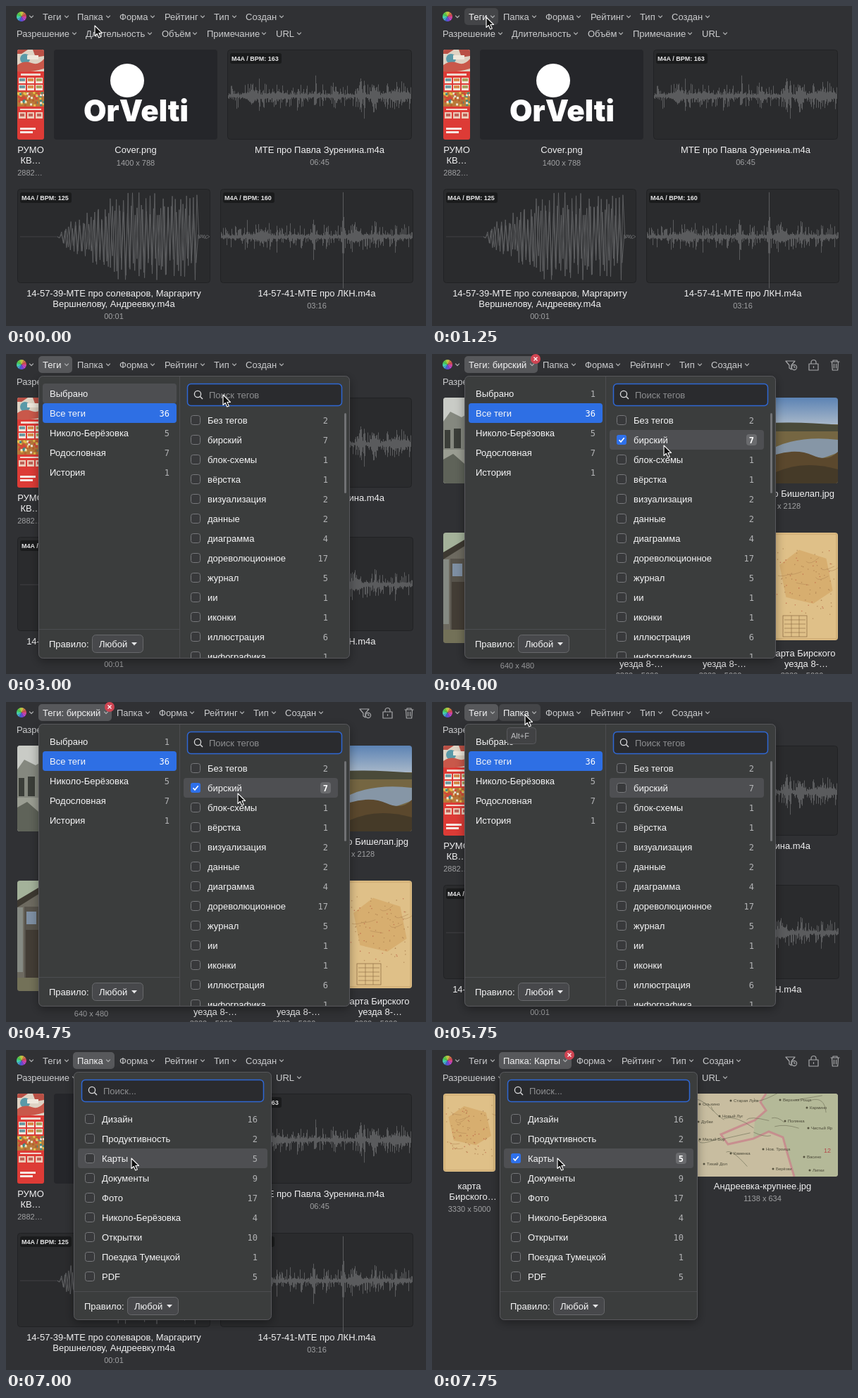
An HTML page for the animation above (8 s loop, 596 by 455 pixels).

```html
<!DOCTYPE html>
<html lang="ru">
<head>
<meta charset="utf-8">
<title>Фильтры</title>
<style>
html, body { margin: 0; width: 100%; height: 100%; overflow: hidden; background: #303134; }
svg { display: block; }
text { font: 13px "Liberation Sans", Arial, sans-serif; white-space: pre; }
.bar { fill: #cbccce; }
.cap { fill: #f0f0f1; text-anchor: middle; }
.dim { fill: #a0a1a3; font-size: 11px; text-anchor: middle; }
.item { fill: #f6f6f7; }
.hint { fill: #8d8e90; }
.num { font: 12px "DejaVu Sans Mono", monospace; fill: #b2b3b5; text-anchor: end; }
.on { fill: #fff; }
.badge { font-size: 9px; font-weight: bold; fill: #e6e6e7; }
.tiny { font-size: 6px; fill: #4a4838; }
.line { fill: none; stroke: #a6a7a9; stroke-width: 1.2; stroke-linecap: round; stroke-linejoin: round; }
</style>
</head>
<body>
<svg id="stage" width="596" height="455" viewBox="0 0 596 455"></svg>
<script>
const LOOP = 8000, STEP = 250;
const stage = document.getElementById('stage');
const $ = id => document.getElementById(id);

const text = (x, y, s, cls, extra = '') => `<text x="${x}" y="${y}" class="${cls}" ${extra}>${s}</text>`;
const rect = (x, y, w, h, fill, r = 0, extra = '') =>
  `<rect x="${x}" y="${y}" width="${w}" height="${h}" rx="${r}" fill="${fill}" ${extra}/>`;
const circle = (x, y, r, fill, extra = '') => `<circle cx="${x}" cy="${y}" r="${r}" fill="${fill}" ${extra}/>`;
const path = (d, extra = '') => `<path d="${d}" ${extra}/>`;
const group = (id, body, extra = '') => `<g id="${id}" ${extra}>${body}</g>`;
const clip = (id, x, y, w, h, r) => `<clipPath id="${id}">${rect(x, y, w, h, '#000', r)}</clipPath>`;
const chevron = (x, y) => path(`M${x - 2.5} ${y - 1}l2.5 2.5 2.5-2.5`, 'class="line"');
const clipped = (id, body) => `<g clip-path="url(#${id})">${body}</g>`;

function random(seed) {
  return () => (seed = (seed * 16807) % 2147483647) / 2147483647;
}

// Waveforms: a dense core with rare long spikes, tallest at the peaks [x, height, width]
function wave(x0, x1, cy, seed, peaks) {
  const rnd = random(seed);
  let d = '';
  for (let x = x0; x < x1; x++) {
    const peak = peaks.reduce((s, [p, h, w = 1]) => s + h * Math.exp(-(((x - p) / w) ** 2)), 0);
    const reach = () => 1.2 + 2.5 * rnd() + 15 * rnd() ** 5 + peak * (.4 + .6 * rnd());
    d += `M${x + .5} ${(cy - reach()).toFixed(1)}V${(cy + reach()).toFixed(1)}`;
  }
  return path(d, 'stroke="#606164" stroke-width=".9"');
}

// Swings of uneven height that widen to the right
function swing(x0, x1, cy, seed, step) {
  const rnd = random(seed);
  let d = `M${x0} ${cy}`;
  for (let x = x0, k = 0; x < x1; x += step * (.85 + .3 * rnd()), k++) {
    const a = (x > 272 ? 3 : 10 + 50 * Math.min(1, (x - x0) / 90)) * Math.min(1, (x - x0) / 12) * (.5 + .55 * rnd());
    d += `L${x.toFixed(1)} ${(cy + (k % 2 ? a : -a)).toFixed(1)}`;
  }
  return path(d + `L289 ${cy}`, 'fill="none" stroke="#606164" stroke-width=".9"');
}

const audioCard = (x, y, w, h, bpm, art) =>
  rect(x + .5, y + .5, w - 1, h - 1, '#2a2b2d', 4, 'stroke="#212224"') + art +
  rect(x + 4, y + 5, 73, 15, '#1a1b1c', 3) + text(x + 6, y + 16, `M4A / BPM: ${bpm}`, 'badge');

function poster() {
  const rnd = random(8), tones = ['#e8c04a', '#d5453a', '#3f8a84', '#efe2d0', '#b8602f'];
  let s = rect(16, 62, 38, 128, '#dd3b36') + rect(16, 62, 38, 31, '#ded3c4') +
    path('M16 62h15l-9 6h-6zM38 62h16v9l-12 2z', 'fill="#b95045"') + circle(27, 75, 7, '#5a9aa8') +
    path('M16 84q10-7 20-3t18-6v14q-20 6-38 4z', 'fill="#c9584a"') + rect(30, 70, 16, 6, '#efe8dc') +
    rect(21, 96, 28, 3, '#f0d8cf');
  for (let i = 0; i < 6; i++) {
    const x = 18 + i % 3 * 12, y = 102 + (i > 2 ? 10 : 0);
    s += rect(x, y, 10, 8, '#f2e6da') + rect(x + 1, y + 1, 8, 4, ['#6c9aa2', '#d8894a', '#a9a05c'][i % 3]);
  }
  s += rect(16, 122, 38, 21, '#b8793a');
  for (let i = 0; i < 70; i++)
    s += rect((16 + 36 * rnd()).toFixed(1), (122 + 18 * rnd()).toFixed(1), 3, 3, tones[i % 5]);
  s += rect(20, 146, 30, 2, '#f2d5ce');
  for (let i = 0; i < 3; i++) s += rect(18 + i * 12, 151, 10, 9, '#eccab8') + rect(20 + i * 12, 153, 6, 4, '#bd6258');
  return s + rect(20, 173, 22, 3, '#f7e6e2') + rect(20, 178, 18, 3, '#f7e6e2');
}

// Old tan map with scattered marks
function tanMap(x, y, w, h, seed) {
  const rnd = random(seed);
  let s = rect(x, y, w, h, '#dfc088') +
    path(`M${x + w * .1} ${y + h * .3}l${w * .3} ${-h * .14} ${w * .42} ${h * .08} ${w * .1} ${h * .3} ${-w * .3} ${h * .12} ${-w * .42} ${-h * .06}z`,
      'fill="#d2a260" opacity=".6"');
  for (let i = 0; i < 80; i++)
    s += circle((x + w * (.06 + .88 * rnd())).toFixed(1), (y + h * (.14 + .66 * rnd())).toFixed(1), .8, i % 3 ? '#a8794a' : '#b9543c', 'opacity=".65"');
  for (let i = 0; i < 7; i++)
    s += path(`M${x + w * rnd()} ${y + h * (.2 + .5 * rnd())}q${8 * rnd()} ${9 * rnd()} ${w * .2} ${12 * rnd() - 6}`,
      'fill="none" stroke="#b58a58" stroke-width=".6"');
  return s + rect(x + 2, y + 2, w - 4, h - 4, 'none', 0, 'stroke="#b99258" stroke-width=".6"');
}

function greenMap() {
  const rnd = random(31);
  let s = rect(362, 62, 214, 118, '#c8bda0') +
    path('M474 62l-8 12 8 12-16 14-2 26 22-10 20 8 6 22 10 34h62V62z', 'fill="#b4b998"') +
    path('M474 62l-8 12 8 12-16 14-20 8-28 12 10 14 36-8 22-10 20 8 6 22 10 34', 'fill="none" stroke="#c9808a" stroke-width="3" opacity=".75"');
  for (let i = 0; i < 13; i++)
    s += path(`M${370 + 190 * rnd()} ${64 + 100 * rnd()}q${20 * rnd()} ${24 * rnd() - 12} ${34 * rnd() + 12} ${40 * rnd() - 16}`,
      'fill="none" stroke="#77785f" stroke-width=".7"');
  [[384, 79, 'Ольхино'], [428, 74, 'Старая Лука'], [498, 73, 'Верхняя Роща'], [536, 84, 'Кармино'], [382, 104, 'Дубки'],
   [412, 96, 'Новый Луг'], [505, 103, 'Полянка'], [538, 113, 'Чистый Яр'], [384, 129, 'Малый Бор'], [428, 149, 'Каменка'],
   [474, 143, 'Нов. Троица'], [532, 154, 'Васино'], [390, 164, 'Тихий Дол'], [488, 171, 'Берёзки'], [540, 173, 'Липки']]
    .forEach(([x, y, name]) => { s += text(x, y, name, 'tiny') + circle(x - 4, y - 2, 1.5, '#55523f'); });
  return s + text(556, 146, '12', 'tiny', 'style="font-size:9px;fill:#b5474a"');
}

const oldPhoto = rect(16, 62, 60, 122, '#b9bbb4') + rect(16, 62, 60, 36, '#c9cbc6') +
  path('M16 96l10-14 16 8 10-6v54H16z', 'fill="#85887f"') + path('M18 108h8v26h-8zM31 106h10v28H31z', 'fill="#3b3e39"') +
  rect(16, 136, 60, 48, '#9a9d92') + path('M16 150l14-8 16 14v28H16z', 'fill="#5f6359"');

const lake = rect(440, 62, 136, 122, 'url(#sky)') + rect(440, 100, 136, 84, '#756642') +
  path('M440 101q60-7 136 0v9H440z', 'fill="#4a4a39"') + path('M488 132q36-16 88-10v18q-40 18-88 14z', 'fill="#8696a6"') +
  path('M488 143q30-9 52 1t36-5v45h-88z', 'fill="#5b482d"') + path('M488 168q40-18 88-4v20h-88z', 'fill="#453a28"');

const house = rect(16, 254, 90, 157, '#6d6a60') + path('M16 254h32v9l-32 20z', 'fill="#a4b29a"') + path('M16 282l32-19v9l-32 20z', 'fill="#3d3931"') +
  rect(16, 292, 8, 92, '#858a83') + rect(26, 291, 20, 110, '#57534b') + rect(29, 298, 14, 18, '#7e8fa3') +
  rect(28, 324, 18, 78, '#433d35') + rect(16, 392, 34, 19, '#737158');

const allGrid =
  clipped('c1', poster()) + text(35, 209, 'РУМО', 'cap') + text(35, 224, 'КВ…', 'cap') + text(34, 241, '2882…', 'dim') +
  rect(68, 62, 232, 128, '#25262a', 4) + circle(172, 106, 24, '#fff') +
  text(110, 164, 'OrVelti', 'on', 'style="font:900 42px Inter,sans-serif"') +
  text(184, 209, 'Cover.png', 'cap') + text(184, 227, '1400 x 788', 'dim') +
  audioCard(314, 62, 262, 128, 163, wave(315, 575, 128, 17,
    [[349, 8, 8], [359, 22], [386, 4, 14], [414, 14], [439, 24], [468, 8, 3], [503, 24, 2], [508, 32], [522, 16, 4], [541, 22], [556, 7, 14]])) +
  text(445, 209, 'МТЕ про Павла Зуренина.m4a', 'cap') + text(445, 226, '06:45', 'dim') +
  audioCard(16, 260, 274, 134, 125, path('M20 328H73', 'stroke="#404144"') + swing(73, 286, 328, 77, 3.1) + swing(73, 286, 328, 15, 2.6)) +
  text(153, 413, '14-57-39-МТЕ про солеваров, Маргариту', 'cap') + text(153, 428, 'Вершнелову, Андреевку.m4a', 'cap') + text(153, 445, '00:01', 'dim') +
  audioCard(304, 260, 274, 134, 160, wave(305, 577, 328, 29,
    [[342, 16], [362, 8, 10], [384, 20], [403, 16], [436, 22, 2], [455, 20], [478, 62], [496, 8, 8], [524, 14, 2], [553, 14]])) +
  text(441, 413, '14-57-41-МТЕ про ЛКН.m4a', 'cap') + text(441, 430, '03:16', 'dim');

const tagGrid =
  clipped('c2', oldPhoto) + clipped('c3', lake) + clipped('c4', house) + clipped('c5', tanMap(484, 254, 92, 153, 5)) +
  rect(498, 372, 34, 30, 'none', 0, 'stroke="#8b6840" stroke-width=".7"') +
  path('M500 378h30M500 384h30M500 390h30M500 396h30M510 372v30M521 372v30', 'stroke="#8b6840" stroke-width=".6"') +
  text(571, 203, 'р Бишелап.jpg', 'cap', 'style="text-anchor:end"') + text(523, 220, 'x 2128', 'dim', 'style="text-anchor:end"') +
  text(121, 447, '640 x 480', 'dim') + text(527, 430, 'карта Бирского', 'cap') +
  [297, 415, 531].map(x => text(x, 445, 'уезда 8-…', 'cap') + text(x - 6, 461, '3330 x 5000', 'dim')).join('');

const mapGrid =
  clipped('c6', tanMap(16, 62, 74, 111, 9)) + text(53, 198, 'карта', 'cap') + text(58, 213, 'Бирского…', 'cap') + text(53, 230, '3330 x 5000', 'dim') +
  clipped('c7', greenMap()) + text(469, 198, 'Андреевка-крупнее.jpg', 'cap') + text(469, 215, '1138 x 634', 'dim');

function wheel() {
  let s = '';
  for (let i = 0; i < 12; i++) {
    const p = k => `${22 + 7 * Math.sin(k * Math.PI / 6)} ${15 - 7 * Math.cos(k * Math.PI / 6)}`;
    s += path(`M22 15L${p(i)}A7 7 0 0 1 ${p(i + 1)}z`, `fill="hsl(${50 - i * 30} 58% 54%)"`);
  }
  return s + chevron(36, 15);
}

const lateItems = [[161, 'Форма', 208], [225, 'Рейтинг', 279], [295, 'Тип', 324], [340, 'Создан', 391]];
const lowItems = [[15, 'Разрешение', 97], [113, 'Длительность', 204], [221, 'Объём', 268], [285, 'Примечание', 366], [383, 'URL', 416]];
const menuItems = (list, y) => list.map(([x, s, c]) => text(x, y, s, 'bar') + chevron(c, y - 4.5)).join('');
const closeMark = id => group(id, circle(0, 7, 7, '#cf4452') + path('M-2.5 4.5l5 5m0-5l-5 5', 'stroke="#fff" stroke-width="1.2"'));

const toolIcons =
  path('M502 10h13l-5 6v6l-3-2v-4z', 'class="line"') + circle(514, 19, 3.6, '#303134', 'class="line" style="fill:#303134"') + path('M514 17v2h1.5', 'class="line"') +
  path('M535 14h13v9h-13zM538 14v-2a3.5 3.5 0 0 1 7 0v2M541.500 17.500v2', 'class="line"') +
  path('M566 11h12M569 11v-2h6v2M567.500 11l.8 12h7.400l.8-12M570.500 14v6M573.500 14v6', 'class="line"');

const bar = wheel() +
  rect(46, 3, 48, 24, '#57585b', 5, 'id="tagBtn"') + text(52, 19.5, 'Теги', 'bar', 'id="tagText"') + group('tagChev', chevron(86, 15)) +
  group('folder', rect(95, 3, 59, 24, '#57585b', 5, 'id="folBtn"') + text(101, 19.5, 'Папка', 'bar', 'id="folText"') + group('folChev', chevron(145, 15))) +
  group('late', menuItems(lateItems, 19.5)) + closeMark('tagClose') + closeMark('folClose') + group('icons', toolIcons);

const panel = (x, y, w, h) => rect(x + .5, y + .5, w - 1, h - 1, '#3b3c3e', 6, 'stroke="#58595c" filter="url(#shadow)"');
const search = (x, w, s) => rect(x + .5, 42.5, w - 1, 31, '#2a2b2e', 5, 'stroke="#2f67d3" stroke-width="1.5"') +
  circle(x + 15, 57, 4.6, 'none', 'stroke="#dcdcde" stroke-width="1.3"') +
  path(`M${x + 18.5} 60.500l3.500 3.500`, 'stroke="#dcdcde" stroke-width="1.4"') + text(x + 31, 62.5, s, 'hint');
const rule = (x, y) => text(x, y + 4.5, 'Правило:', 'item') +
  rect(x + 61.5, y - 12.5, 72, 25, '#47484b', 5, 'stroke="#67686b"') + text(x + 71, y + 4.5, 'Любой', 'item') +
  path(`M${x + 117} ${y - 2}h8l-4 4.500z`, 'fill="#e6e6e8"');
const checks = (x, y0, numX, list) => list.map(([s, n], i) => {
  const y = y0 + 28 * i;
  return rect(x + .5, y - 6.5, 13, 13, '#38393b', 3, 'stroke="#77787b"') + text(x + 24, y + 4.5, s, 'item') + text(numX, y + 4.5, n, 'num');
}).join('');
const ticked = (id, x, y, numX, n) => group(id, rect(x, y - 7, 14, 14, '#2e70ea', 3) +
  path(`M${x + 3.5} ${y + .2}l2.500 2.800 4.700-5.800`, 'fill="none" stroke="#fff" stroke-width="1.7"') +
  rect(numX - 11, y - 8, 15, 16, '#6a6b6e', 4) + text(numX, y + 4.5, n, 'num on', 'style="font-weight:bold"'));

const tags = [['Без тегов', 2], ['бирский', 7], ['блок-схемы', 1], ['вёрстка', 1], ['визуализация', 2], ['данные', 2], ['диаграмма', 4],
  ['дореволюционное', 17], ['журнал', 5], ['ии', 1], ['иконки', 1], ['иллюстрация', 6], ['инфографика', 1]];
const folders = [['Дизайн', 16], ['Продуктивность', 2], ['Карты', 5], ['Документы', 9], ['Фото', 17], ['Николо-Берёзовка', 4],
  ['Открытки', 10], ['Поездка Тумецкой', 1], ['PDF', 5]];
const sets = [['Выбрано', ''], ['Все теги', 36], ['Николо-Берёзовка', 5], ['Родословная', 7], ['История', 1]];

const tagMenu = panel(46, 31, 442, 402) + path('M246.500 32V432M47 391.500H246', 'stroke="#4c4d50"') +
  rect(52, 42, 190, 28, '#4d4e51', 4, 'id="pickHover"') + rect(52, 70, 190, 28, '#2e6fe4', 4) +
  sets.map(([s, n], i) => text(62, 60.5 + 28 * i, s, 'item') + text(232, 60.5 + 28 * i, n, i === 1 ? 'num on' : 'num')).join('') +
  text(232, 60.5, '1', 'num', 'id="pickNum"') + rule(61, 412) + search(257, 220, 'Поиск тегов') +
  rect(252, 108, 219, 28, '#4e4f52', 4, 'id="tagHover"') +
  clipped('list', checks(262, 94, 457, tags)) + ticked('tagTick', 262, 122, 457, 7) + rect(480, 84, 3, 114, '#707174', 1.5);

const folderMenu = panel(96, 31, 281, 353) + path('M97 343.500H376', 'stroke="#4c4d50"') + search(107, 259, 'Поиск...') +
  rect(102, 140, 269, 28, '#4e4f52', 4, 'id="folHover"') + checks(112, 98, 357, folders) + ticked('folTick', 112, 154, 357, 5) + rule(111, 364);

const tip = (id, x, s) => group(id, rect(x + .5, 36.5, 41, 23, '#414244', 4, 'stroke="#58595c"') + text(x + 6, 52, s, 'dim', 'style="text-anchor:start;fill:#bebfc1"'));

stage.innerHTML = `<defs>
  ${clip('c1', 16, 62, 38, 128, 3)}${clip('c2', 16, 62, 60, 122, 4)}${clip('c3', 440, 62, 136, 122, 4)}${clip('c4', 16, 254, 90, 157, 4)}
  ${clip('c5', 484, 254, 92, 153, 4)}${clip('c6', 16, 62, 74, 111, 4)}${clip('c7', 362, 62, 214, 118, 4)}${clip('list', 248, 80, 230, 352, 0)}
  <linearGradient id="sky" x2="0" y2="1"><stop offset="0" stop-color="#5c83b4"/><stop offset=".34" stop-color="#aebccb"/></linearGradient>
  <filter id="shadow" x="-10%" y="-10%" width="120%" height="120%"><feDropShadow dx="0" dy="4" stdDeviation="7" flood-opacity=".35"/></filter>
</defs>` + rect(0, 0, 596, 455, '#303134') +
  group('allGrid', allGrid) + group('tagGrid', tagGrid) + group('mapGrid', mapGrid) + menuItems(lowItems, 43.5) + bar +
  group('tagMenu', tagMenu) + group('folMenu', folderMenu) + tip('tagTip', 50, 'Alt+T') + tip('folTip', 106, 'Alt+F') +
  group('cursor', path('M0 0V14.500L3.300 11.500 5.700 17 8.300 15.900 5.900 10.500H10.500z', 'fill="#111" stroke="#fff" stroke-width="1.1" stroke-linejoin="round"'));

// Cursor stops: time, x, y
const stops = [[0, 126, 28], [250, 126, 28], [1250, 77, 16], [2500, 77, 16], [3000, 308, 58], [3250, 330, 118], [3500, 330, 118],
  [3750, 329, 130], [5000, 329, 130], [5500, 132, 18], [6500, 132, 18], [7000, 178, 154], [LOOP, 178, 154]];

const ramp = (t, a, b) => Math.max(0, Math.min(1, (t - a) / (b - a)));
const ease = k => k * k * (3 - 2 * k);
const show = (id, on) => { $(id).style.display = on ? '' : 'none'; };
const fade = (id, o, dy = 0) => {
  show(id, o > 0);
  $(id).setAttribute('opacity', o);
  $(id).setAttribute('transform', `translate(0 ${dy})`);
};
const move = (id, x, y = 0) => $(id).setAttribute('transform', `translate(${x} ${y})`);
const within = (t, a, b) => t >= a && t < b;

function place(t) {
  const i = stops.findIndex((s, n) => n && t <= s[0]);
  const [t0, x0, y0] = stops[i - 1], [t1, x1, y1] = stops[i];
  const k = ease(ramp(t, t0, t1));
  return [x0 + (x1 - x0) * k, y0 + (y1 - y0) * k];
}

function button(name, hover, active, label, width) {
  show(name + 'Btn', hover || active);
  $(name + 'Btn').setAttribute('fill', active ? '#57585b' : '#444548');
  $(name + 'Btn').setAttribute('width', width);
  $(name + 'Text').textContent = label;
  $(name + 'Text').style.fill = hover || active ? '#f2f2f3' : '';
}

function draw(t) {
  const tagOn = within(t, 4000, 5000), folOn = t >= 7500;
  const tagShift = tagOn ? 56 : 0, folShift = folOn ? 44 : 0;
  const [x, y] = place(t);

  show('allGrid', !tagOn && !folOn);
  show('tagGrid', tagOn);
  show('mapGrid', folOn);
  show('icons', tagOn || folOn);

  const overTag = y < 27 && x >= 46 && x < 94, overFol = y < 27 && x >= 95 && x < 154;
  button('tag', overTag, within(t, 2500, 6250), tagOn ? 'Теги: бирский' : 'Теги', 48 + tagShift);
  button('fol', overFol, t >= 6250, folOn ? 'Папка: Карты' : 'Папка', 59 + folShift);
  move('tagChev', tagShift);
  move('folder', tagShift);
  move('folChev', folShift);
  move('late', tagShift + folShift);
  move('tagClose', 147);
  move('folClose', 195);
  show('tagClose', tagOn);
  show('folClose', folOn);

  const tagIn = ramp(t, 2170, 2500), folIn = ramp(t, 6170, 6500);
  fade('tagMenu', tagIn * (1 - ramp(t, 6000, 6400)), -4 * (1 - tagIn));
  fade('folMenu', folIn, -4 * (1 - folIn));
  show('pickHover', within(t, 2750, 3250));
  show('pickNum', tagOn);
  show('tagHover', t >= 3250);
  show('tagTick', tagOn);
  show('folHover', t >= 7000);
  show('folTick', folOn);

  fade('tagTip', ramp(t, 1250, 1500) * (1 - ramp(t, 1900, 2350)));
  fade('folTip', ramp(t, 5500, 5750) * (1 - ramp(t, 6000, 6400)));
  move('cursor', x, y);
}

const start = performance.now();
let last = -1;
function tick(now) {
  const t = Math.floor(Math.max(0, now - start) % LOOP / STEP) * STEP;
  if (t !== last) draw(last = t);
  requestAnimationFrame(tick);
}
draw(0);
requestAnimationFrame(tick);
</script>
</body>
</html>
```
